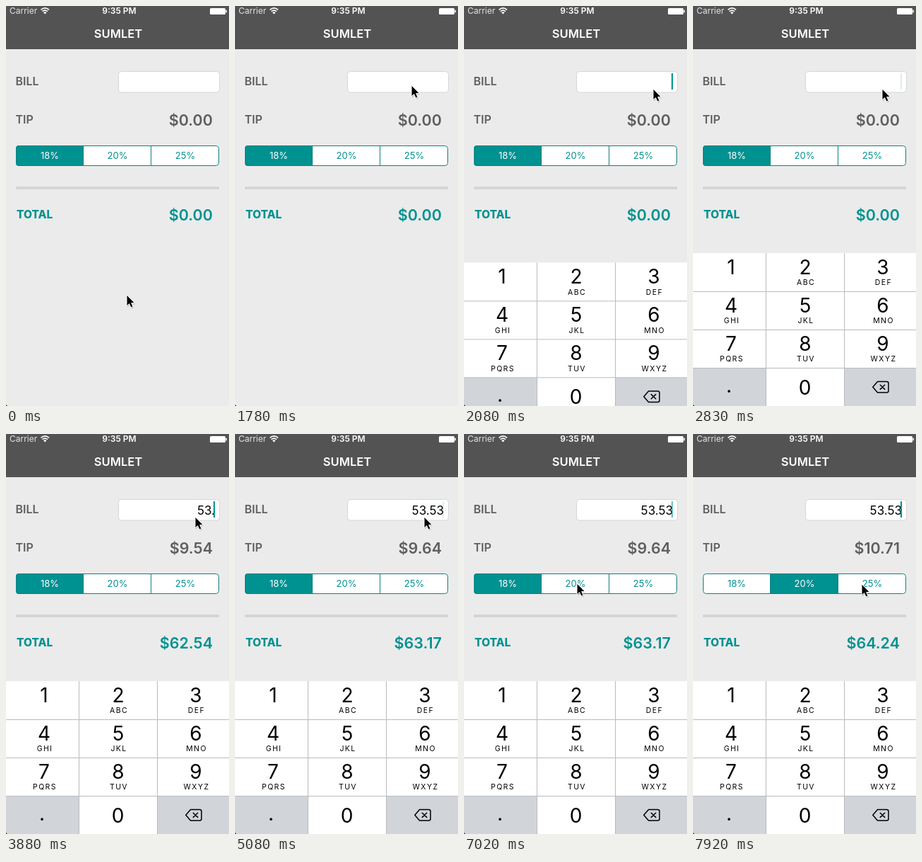
Recreate the animation shown at these times as an HTML page. Size 316 by 565 pixels, loop 8000 ms.

```html
<!DOCTYPE html>
<html lang="en">
<head>
<meta charset="utf-8">
<title>Tip calculator</title>
<style>
  html, body { margin: 0; width: 100%; height: 100%; overflow: hidden; background: #ebebeb; }
  svg { display: block; width: 316px; height: 565px; font-family: Inter, Roboto, sans-serif; }
  .mid { text-anchor: middle; }
  .end { text-anchor: end; }
  .label { font-size: 16px; font-weight: 600; fill: #5f5f5f; }
  .money { font-size: 21.5px; font-weight: 600; fill: #5f5f5f; }
  .seg { font-size: 13px; }
  .digit { font-size: 28px; }
  .letters { font-size: 10.5px; letter-spacing: 1.4px; }
  .teal { fill: #009191; }
</style>
</head>
<body>
<svg viewBox="0 0 316 565">
  <rect width="316" height="565" fill="#ebebeb"/>
  <rect width="316" height="61" fill="#535353"/>

  <g fill="#fff">
    <text x="5" y="11" font-size="12" fill="#e4e4e4">Carrier</text>
    <g fill="none" stroke="#fff" stroke-width="1.6">
      <path d="M49.5 5.4Q55.3 .4 61 5.4M51.5 7.7Q55.3 4.5 59 7.7"/>
    </g>
    <path d="M53 9.2Q55.3 7.5 57.5 9.2L55.3 11.6Z"/>
    <text class="mid" x="160.5" y="11" font-size="12" font-weight="600">9:35 PM</text>
    <rect x="289" y="3" width="22" height="9" rx="1.5"/>
    <rect x="311.5" y="5.5" width="1.5" height="4" rx=".7"/>
    <text class="mid" x="159" y="45" font-size="16.5" font-weight="600">SUMLET</text>
  </g>

  <text class="label" x="13.5" y="112">BILL</text>
  <rect x="159.5" y="92.5" width="143" height="29.5" rx="4" fill="#fff" stroke="#d6d6d6"/>
  <text id="bill" class="end" x="296" y="113.5" font-size="17"></text>
  <rect id="caret" class="teal" x="294" y="95" width="2" height="23"/>

  <text class="label" x="13.5" y="166">TIP</text>
  <text id="tip" class="money end" x="293" y="168.5"></text>

  <clipPath id="pill"><rect x="14" y="197" width="288" height="29" rx="4"/></clipPath>
  <g clip-path="url(#pill)">
    <rect x="14" y="197" width="288" height="29" fill="#fff"/>
    <rect id="pick" class="teal" y="197" width="96" height="29"/>
  </g>
  <path d="M109.5 197V226M205.5 197V226" stroke="#127f7f"/>
  <rect x="14.5" y="197.5" width="287" height="28" rx="4" fill="none" stroke="#127f7f"/>
  <g id="segs"></g>

  <rect x="14" y="255" width="288" height="4" fill="#d5d5d5"/>
  <text class="teal" x="15" y="300.3" font-size="15.5" font-weight="800">TOTAL</text>
  <text id="total" class="money teal end" style="fill:#009191" x="293" y="302.5"></text>

  <g id="keys">
    <rect y="349" width="316" height="216" fill="#fff"/>
    <path d="M0 511.5H103.5V565H0ZM214.5 511.5H316V565H214.5Z" fill="#d1d5da"/>
    <path d="M0 403.5H316M0 457.5H316M0 511.5H316M103.5 349V565M214.5 349V565" stroke="#b9bbbe"/>
    <g fill="none" stroke="#000" stroke-width="1.5" stroke-linejoin="round" stroke-linecap="round">
      <path d="M261.5 530.5H274.5Q277 530.5 277 533V543.5Q277 546 274.5 546H261.5L254.8 538.3Z"/>
      <path d="M265.3 535.2L271.7 541.4M271.7 535.2L265.3 541.4"/>
    </g>
  </g>

  <path d="M0 563L2 565H0Z" fill="#222"/>
  <g id="cursor">
    <path d="M1 2V17.5L4.6 14.3L7 19.6L10 18.3L7.7 13.2H12.3Z" fill="#000" opacity=".18"/>
    <path d="M0 0V15.8L3.6 12.6L6 18L9 16.7L6.7 11.5H11.5Z" fill="#000" stroke="#fff" stroke-linejoin="round"/>
  </g>
</svg>
<script>
const LOOP = 8000;
const RATES = [18, 20, 25];
const PICK_AT = 7320;
const KEYS_AT = 1835;

// [time, x, y]
const PATH = [
  [0, 171, 408], [750, 177, 384], [900, 207, 270], [1050, 247, 120], [1180, 262, 34],
  [1330, 253, 104], [1780, 250, 112], [1930, 261, 115], [2080, 268, 117],
  [5380, 264, 121], [5530, 247, 142], [5680, 215, 176], [5830, 182, 206],
  [5970, 164, 216], [6120, 161, 215], [6270, 160, 213], [6420, 159, 212], [6570, 160, 211],
  [7470, 163, 212], [7620, 184, 214], [7770, 218, 214], [7920, 239, 212]
];
const TYPED = [[0, ""], [3280, "5"], [3430, "53"], [3880, "53."], [4330, "53.5"], [4480, "53.53"]];

const $ = id => document.getElementById(id);
const at = (steps, t) => steps.findLast(s => s[0] <= t);
const money = v => "$" + v.toFixed(2);

function addText(parent, cls, x, y, str) {
  const el = document.createElementNS("http://www.w3.org/2000/svg", "text");
  el.setAttribute("class", cls + " mid");
  el.setAttribute("x", x);
  el.setAttribute("y", y);
  el.textContent = str;
  parent.append(el);
  return el;
}

const segs = RATES.map((r, i) => addText($("segs"), "seg", 62 + 96 * i, 216.3, r + "%"));

const COLS = [54, 159, 269];
["", "ABC", "DEF", "GHI", "JKL", "MNO", "PQRS", "TUV", "WXYZ"].forEach((str, i) => {
  const x = COLS[i % 3], y = 349 + 54 * Math.floor(i / 3);
  addText($("keys"), "digit", x, y + 30, i + 1);
  addText($("keys"), "letters", x + 1, y + 45.3, str);
});
addText($("keys"), "digit", 51, 546, ".");
addText($("keys"), "digit", 158.5, 548.5, "0");

// The screen was refreshed about every 150 ms
function tick(t) {
  const shift = t < 1180 ? 0 : t < 6100 ? 20 : 30;
  return Math.floor((t + shift) / 150) * 150 - shift;
}

function caretAlpha(t) {
  if (t < 1930) return 0;
  if (t < 2210 || (t >= 3280 && t < 4460)) return 1;
  const u = (t - (t < 3280 ? 2210 : 4460)) % 1000;
  if (u < 500) return 1;
  return u < 930 ? Math.max(0, (640 - u) / 140) : (u - 930) / 70;
}

// Critically damped slide
function keysDrop(t) {
  const w = Math.max(0, t - KEYS_AT) * 0.0183;
  return 216 * (1 + w) * Math.exp(-w);
}

function draw(time) {
  const t = Math.max(0, tick(time));
  const picked = t >= PICK_AT ? 1 : 0;
  const [, x, y] = at(PATH, t);
  const typed = at(TYPED, t)[1];
  const bill = Number(typed);
  const tip = bill * RATES[picked] / 100;

  $("cursor").setAttribute("transform", `translate(${x} ${y})`);
  $("keys").setAttribute("transform", `translate(0 ${keysDrop(t).toFixed(1)})`);
  $("caret").setAttribute("opacity", caretAlpha(t));
  $("bill").textContent = typed;
  $("tip").textContent = money(tip);
  $("total").textContent = money(bill + tip);
  $("pick").setAttribute("x", 14 + 96 * picked);
  segs.forEach((s, i) => s.setAttribute("fill", i === picked ? "#fff" : "#009191"));
}

const start = performance.now();
function frame() {
  draw((performance.now() - start) % LOOP);
  requestAnimationFrame(frame);
}
frame();
</script>
</body>
</html>
```
